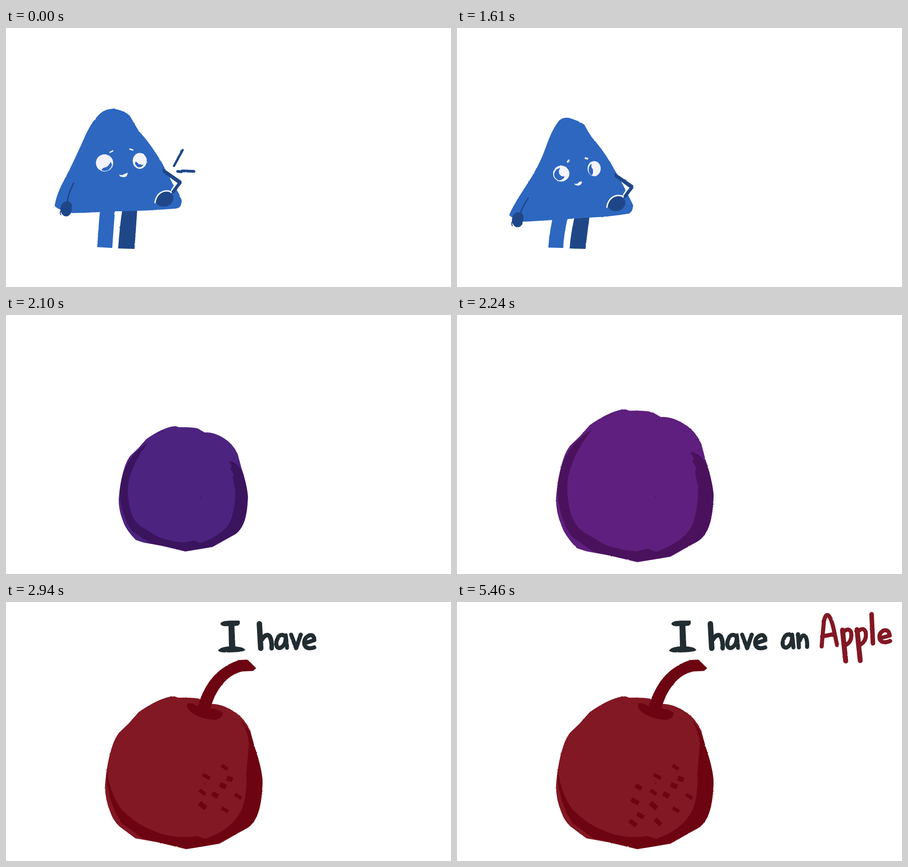
An HTML page without scripts that plays this animation: 980 px wide and 571 px high, repeating every 5.74 s.

```html
<!DOCTYPE html>
<html lang="en">
<head>
<meta charset="utf-8">
<title>I have an Apple</title>
<style>
html, body { margin: 0; width: 100%; height: 100%; overflow: hidden; background: #fff; }
svg { display: block; width: 100%; height: 100%; }

/* One tick is 70 ms, a loop is 82 ticks. --t is the tick a layer starts on, kN keeps it for N ticks. */
.on { visibility: hidden; animation: 5.74s step-end calc(var(--t) * 70ms - 5.74s) infinite; }
@keyframes k1 { 0% { visibility: visible } 1.21951%, 100% { visibility: hidden } }
@keyframes k2 { 0% { visibility: visible } 2.43902%, 100% { visibility: hidden } }
@keyframes k3 { 0% { visibility: visible } 3.65853%, 100% { visibility: hidden } }
@keyframes k4 { 0% { visibility: visible } 4.87804%, 100% { visibility: hidden } }
@keyframes k10 { 0% { visibility: visible } 12.19512%, 100% { visibility: hidden } }
@keyframes k16 { 0% { visibility: visible } 19.51219%, 100% { visibility: hidden } }
@keyframes k19 { 0% { visibility: visible } 23.17073%, 100% { visibility: hidden } }
@keyframes k22 { 0% { visibility: visible } 26.82926%, 100% { visibility: hidden } }
@keyframes k28 { 0% { visibility: visible } 34.14634%, 100% { visibility: hidden } }
@keyframes k34 { 0% { visibility: visible } 41.46341%, 100% { visibility: hidden } }
@keyframes k40 { 0% { visibility: visible } 48.78048%, 100% { visibility: hidden } }
@keyframes k46 { 0% { visibility: visible } 56.09756%, 100% { visibility: hidden } }

svg { --main: #2d67c0; --dark: #1f4788; --ink: #222d32; --red: #821823; }
.rough { filter: url(#rough); }
.m { fill: var(--main); }
.d { fill: var(--dark); }
.w { fill: #f3f3fb; }
.ln { fill: none; stroke: var(--dark); stroke-width: 3; stroke-linecap: round; }
.wl { fill: none; stroke: #f6f6fc; stroke-width: 3; stroke-linecap: round; }
.pen { fill: none; stroke: var(--ink); stroke-width: 9; stroke-linecap: round; stroke-linejoin: round; }
.red { stroke: var(--red); }
.dots { fill: none; stroke: var(--dark); stroke-width: 8; }
</style>
</head>
<body>
<svg viewBox="0 0 980 571" role="img" aria-label="I have an Apple">
<defs>
  <filter id="rough" filterUnits="userSpaceOnUse" x="0" y="0" width="980" height="571" color-interpolation-filters="sRGB">
    <feTurbulence type="fractalNoise" baseFrequency=".16" numOctaves="2" seed="4"/>
    <feDisplacementMap in="SourceGraphic" scale="2" xChannelSelector="R" yChannelSelector="G"/>
  </filter>

  <!-- bent arm, fist on the hip -->
  <g id="arm">
    <path fill="#fff" d="M361 364Q367 346 380 339L384 342L367 364Z"/>
    <path class="d" d="M345 309L357 317L386 337L387 342L372 362L367 366L363 362L378 342L356 326L345 318Z"/>
    <ellipse class="d" cx="349" cy="377" rx="20" ry="16.5" transform="rotate(-15 349 377)"/>
    <path class="wl" d="M328 385Q332 362 352 359Q360 359 364 362"/>
  </g>

  <g id="hand">
    <path class="d" d="M122 390Q127 381 138 382Q147 386 145 397Q145 411 136 415Q127 417 122 408Q118 400 122 390Z"/>
    <path class="ln" style="stroke-width:2" d="M121 402Q118 408 121 412"/>
  </g>

  <g id="eyes">
    <circle class="w" cx="217" cy="297.500" r="19"/>
    <ellipse class="w" cx="294.500" cy="293" rx="15.500" ry="17.500"/>
  </g>
  <g id="pupils">
    <path class="m" d="M210 313Q214 307 220 307Q228 303 230 295Q236 301 230 309Q221 319 210 313Z"/>
    <path class="m" d="M284 296Q287 293 291 299Q296 303 303 301Q299 308 292 307Q285 305 284 296Z"/>
  </g>
  <g id="aside">
    <ellipse class="w" cx="229.500" cy="321" rx="18" ry="17.500"/>
    <ellipse class="w" cx="302" cy="310" rx="14.500" ry="16.500"/>
    <path class="m" d="M227 308Q222 319 227 324Q231 328 237 327Q234 336 224 336Q213 331 214 321Q217 310 227 308Z"/>
    <path class="m" d="M297 299Q294 306 299 311Q301 320 297 325Q290 322 290 311Q291 302 297 299Z"/>
  </g>

  <g id="stand">
    <path class="m" d="M207 402L240 402Q237 440 234 485L201 483Q203 445 207 402Z"/>
    <path class="d" d="M256 401L289 401Q286 445 283 487L247 486Q250 440 256 401Z"/>
    <path class="m" d="M107 392Q111 368 124 343Q148 298 172 243Q188 206 208 188Q220 178 236 178Q262 182 273 194Q282 210 293 228Q318 254 345 300L368 345Q381 361 387 381Q386 396 376 398Q300 404 240 404Q190 407 147 408Q115 402 107 392Z"/>
    <path class="ln" d="M149 342Q138 362 134 386"/>
    <use href="#hand"/>
    <use href="#arm"/>
    <path class="wl" d="M229 274L235 271M273 267L279 269"/>
    <path class="w" d="M249 323Q257 326 260 322L268 319Q268 329 258 329Q250 328 249 323Z"/>
  </g>

  <g id="legs">
    <path class="m" d="M214 405L247 405Q235 452 234 485L201 484Q204 444 214 405Z"/>
    <path class="d" d="M263 400L294 400Q287 450 283 487L248 486Q251 445 263 400Z"/>
  </g>
  <g id="squat">
    <path class="m" d="M115 412Q122 394 152 348Q181 305 196 262Q210 221 226 203Q234 197 246 198Q272 206 281 214Q288 228 297 241Q325 272 349 316L372 358L388 391Q387 405 379 409Q340 416 290 418Q200 424 148 427Q120 420 115 412Z"/>
    <path class="ln" d="M157 375Q145 393 138 412"/>
    <use href="#hand" x="1" y="24"/>
    <use href="#arm" x="2" y="10"/>
    <use href="#aside"/>
    <path class="wl" style="stroke-width:4" d="M244 295L246 292M283 287L287 288"/>
    <path class="w" d="M258 343Q266 345 269 339L275 338Q276 346 267 347.500Q259 347 258 343Z"/>
  </g>
  <g id="jump"><use href="#legs"/><use href="#squat"/></g>

  <!-- smeared leap -->
  <g id="tail">
    <path class="m" d="M228 466Q244 425 276 381Q325 320 378 306Q400 309 406 324Q412 340 402 364Q385 402 360 431Q325 472 275 496Q315 488 350 461Q398 438 432 408Q395 465 295 517Q352 500 385 473Q440 420 480 349L497 318Q512 290 516 264Q516 245 500 237L462 209Q430 206 385 207Q350 212 322 241Q276 293 258 345Q244 395 241 423Z"/>
    <path class="d" d="M497 318Q493 362 462 405Q435 445 410 470L362 492Q408 462 440 420Q470 378 483 344Z"/>
    <path class="d" d="M245 516Q312 490 352 457Q328 488 290 502Q265 513 255 513Z"/>
    <path class="ln" style="stroke-width:2" d="M416 370Q393 412 348 457"/>
  </g>
  <g id="leap">
    <use href="#tail"/>
    <path class="d" d="M428 208L462 206L469 213L440 212ZM483 228Q510 241 508 266L502 267Z"/>
    <path class="w" d="M453 210L468 214L465 217Z"/>
    <path class="wl" style="stroke-width:1.5" d="M468 214L484 228L503 265"/>
    <ellipse class="w" cx="408" cy="226" rx="26" ry="7" transform="rotate(3 408 226)"/>
    <ellipse class="w" cx="424.500" cy="259" rx="25" ry="10.500" transform="rotate(8 424 259)"/>
    <path class="m" d="M387 229Q410 225 432 228Q422 233 402 231ZM404 264Q420 263 439 256Q445 259 447 265Q430 271 404 264Z"/>
    <path class="wl" d="M367 242L372 238M374 261L383 258M453 244Q458 246 459 250"/>
  </g>

  <path id="ball" class="m" d="M371 208L380 211Q410 210 430 214L449 225Q472 223 500 240Q526 256 538 284L547 318Q562 362 565 397Q564 448 552 473Q543 492 530 499L470 533L397 545L335 530L285 521L250 495Q236 482 230 464Q218 436 218 405Q222 352 235 315Q240 300 249 288L270 268L292 243Q330 216 360 209Z"/>
  <path id="speck" class="d" d="M436 397L439 399L438 404Z"/>
  <g id="plum">
    <use href="#ball"/>
    <path class="m" d="M230 464Q238 488 264 514L285 521Z"/>
    <path class="d" d="M514 303L520 302L532 308Q547 320 553 338Q565 380 565 400Q562 450 551 473Q543 490 530 499L470 531Q440 539 397 543L302 523L252 488Q222 440 221 385Q226 320 262 280Q280 262 298 252Q262 295 246 350Q240 380 245 410Q252 466 285 482L325 506Q360 519 395 521L420 515L438 522Q500 500 518 464Q532 425 531 380L524 346L527 338L518 322L522 316ZM318 232Q330 222 346 217Z"/>
    <use href="#speck"/>
  </g>
  <g id="fruit">
    <use href="#ball"/>
    <path class="d" d="M518 262Q538 280 547 318Q565 370 565 398Q562 448 552 473Q543 492 530 499L470 531Q440 539 397 544L300 521L254 487Q219 430 222 372Q232 432 257 460Q290 492 322 503Q365 524 420 516L438 522Q497 503 519 458Q532 425 529 380L535 312Q533 286 518 262Z"/>
    <use href="#speck"/>
  </g>
  <path id="stem" class="d" d="M422 230Q431 200 448 175Q472 142 513 128L531 127L539 134L551 146L544 152L522 153Q495 158 478 180Q460 200 450 235Q462 234 478 244Q475 258 460 260Q425 258 404 240Q394 228 402 223Q412 223 422 230Z"/>
  <path id="a" d="M616 77Q607 68 600 77Q592 91 597 99Q604 106 613 93Q617 84 616 73L619 101"/>
  <g id="p">
    <path style="stroke-width:11" d="M849 62L856 130"/>
    <path d="M851 66Q863 55 868 67Q871 87 856 95"/>
  </g>
</defs>

<g class="rough">
  <use class="on" href="#stand" style="--t:0;animation-name:k19"/>
  <g class="on" style="--t:0;animation-name:k4">
    <use href="#eyes"/><use href="#pupils"/>
    <path class="ln" style="stroke-width:5" d="M389 269L370 304"/>
    <path class="ln" style="stroke-width:6" d="M378 316L386 317M388 315L414 316"/>
  </g>
  <g class="on" style="--t:4;animation-name:k4"><use href="#eyes"/><use href="#pupils" x="-4" y="-3"/></g>
  <path class="on wl" style="--t:8;animation-name:k3" d="M200 300Q216 314 234 299M280 296Q294 308 308 295"/>
  <g class="on" style="--t:11;animation-name:k4"><use href="#eyes"/><use href="#pupils" x="-4" y="-3"/></g>
  <use class="on" href="#aside" x="-10" y="-21" style="--t:15;animation-name:k4"/>

  <g class="on" style="--t:19;animation-name:k4"><use href="#legs"/><use href="#squat" x="-2" y="-5"/></g>
  <use class="on" href="#jump" style="--t:23;animation-name:k1"/>
</g>

<g>
  <use class="on" href="#jump" transform="translate(242 486) skewX(-9) scale(.95 1.17) translate(-242 -486)" style="--t:24;--main:#2d5bb3;--dark:#1f3e7e;animation-name:k1"/>
  <use class="on" href="#jump" transform="translate(60 -30) rotate(38 250 400)" style="--t:25;--main:#2d4aa3;--dark:#1f3274;animation-name:k1"/>
  <use class="on" href="#leap" transform="translate(-50 -45) rotate(-30 400 330)" style="--t:26;--main:#2c3a92;--dark:#1f2668;animation-name:k1"/>
  <use class="on" href="#leap" style="--t:27;--main:#2c2b83;--dark:#1e1a5e;animation-name:k1"/>
  <use class="on" href="#leap" transform="rotate(58 400 330)" style="--t:28;--main:#372882;--dark:#271860;animation-name:k1"/>
  <g class="on" style="--t:29;--main:#432581;--dark:#33165f;animation-name:k1">
    <use href="#tail" transform="translate(395 350) rotate(130) scale(.75) translate(-400 -330)"/>
    <use href="#ball" transform="translate(395 375) scale(.68) translate(-391 -375)"/>
  </g>
  <use class="on" href="#plum" transform="translate(390 382) scale(.82) translate(-391 -375)" style="--t:30;--main:#4d2380;--dark:#3b145e;animation-name:k1"/>
  <use class="on" href="#plum" transform="translate(391 388) scale(.9) translate(-391 -375)" style="--t:31;--main:#57217f;--dark:#43135d;animation-name:k1"/>
</g>

<g class="rough">
  <use class="on" href="#plum" style="--t:32;--main:#5f1f7e;--dark:#4a125c;animation-name:k1"/>
  <g class="on" style="--t:33;--main:#6b1d60;--dark:#550d43;animation-name:k1">
    <use href="#fruit"/><use href="#stem" transform="translate(436 240) scale(.6) translate(-436 -240)"/>
  </g>
  <g class="on" style="--t:34;--main:#771a41;--dark:#610829;animation-name:k2"><use href="#fruit"/><use href="#stem"/></g>

  <g style="--main:var(--red);--dark:#6d0411">
    <g class="on" style="--t:36;animation-name:k46">
      <use href="#fruit"/><use href="#stem"/>
      <path fill="#222d32" d="M472 48Q475 41 494 41L514 41Q517 48 511 52L503 53L505 98Q524 99 527 106Q522 111 490 111Q469 112 467 107Q472 99 491 98L490 53Q474 55 472 48Z"/>
    </g>
    <g class="on" style="--t:42;animation-name:k40">
      <path class="dots" d="M475 360l13 9M433 380l16 9M426 415l13 9M504 424l14 9M475 454l14 8"/>
      <path class="dots" style="stroke-width:11" d="M486 388l13 4M471 402l14 6M454 422l13 7M426 443l14 12"/>
      <g class="pen">
        <path style="stroke-width:12" d="M558 48L561 102"/>
        <path style="stroke-width:10" d="M564 82Q573 68 581 76Q586 86 585 102"/>
        <use href="#a"/>
        <path d="M628 72L639 102L649 72M658 91L679 84Q678 70 667 74Q655 80 657 94Q662 106 679 100"/>
      </g>
    </g>
    <g class="on" style="--t:48;animation-name:k34">
      <path class="dots" style="stroke-width:10" d="M393 404l13 8M384 435l16 9M397 467l14 8M380 482l15 11M436 479l13 12"/>
      <g class="pen">
        <use href="#a" x="122" y="-1"/>
        <path d="M751 71L753 100M755 85Q761 68 768 77Q772 86 771 99"/>
      </g>
    </g>
    <path class="on pen red" style="--t:54;animation-name:k28" d="M803 98L808 43Q811 27 817 29Q824 34 830 62L837 95M804 76L829 71"/>
    <use class="on pen red" href="#p" style="--t:60;animation-name:k22"/>
    <use class="on pen red" href="#p" x="32" y="-1" style="--t:66;animation-name:k16"/>
    <path class="on pen red" style="--t:72;animation-name:k10;stroke-width:10" d="M913 27L916 91"/>
    <path class="on pen red" style="--t:78;animation-name:k4" d="M931 80L953 74Q951 59 939 63Q928 69 931 82Q936 93 954 86"/>
  </g>
</g>
</svg>
</body>
</html>
```
